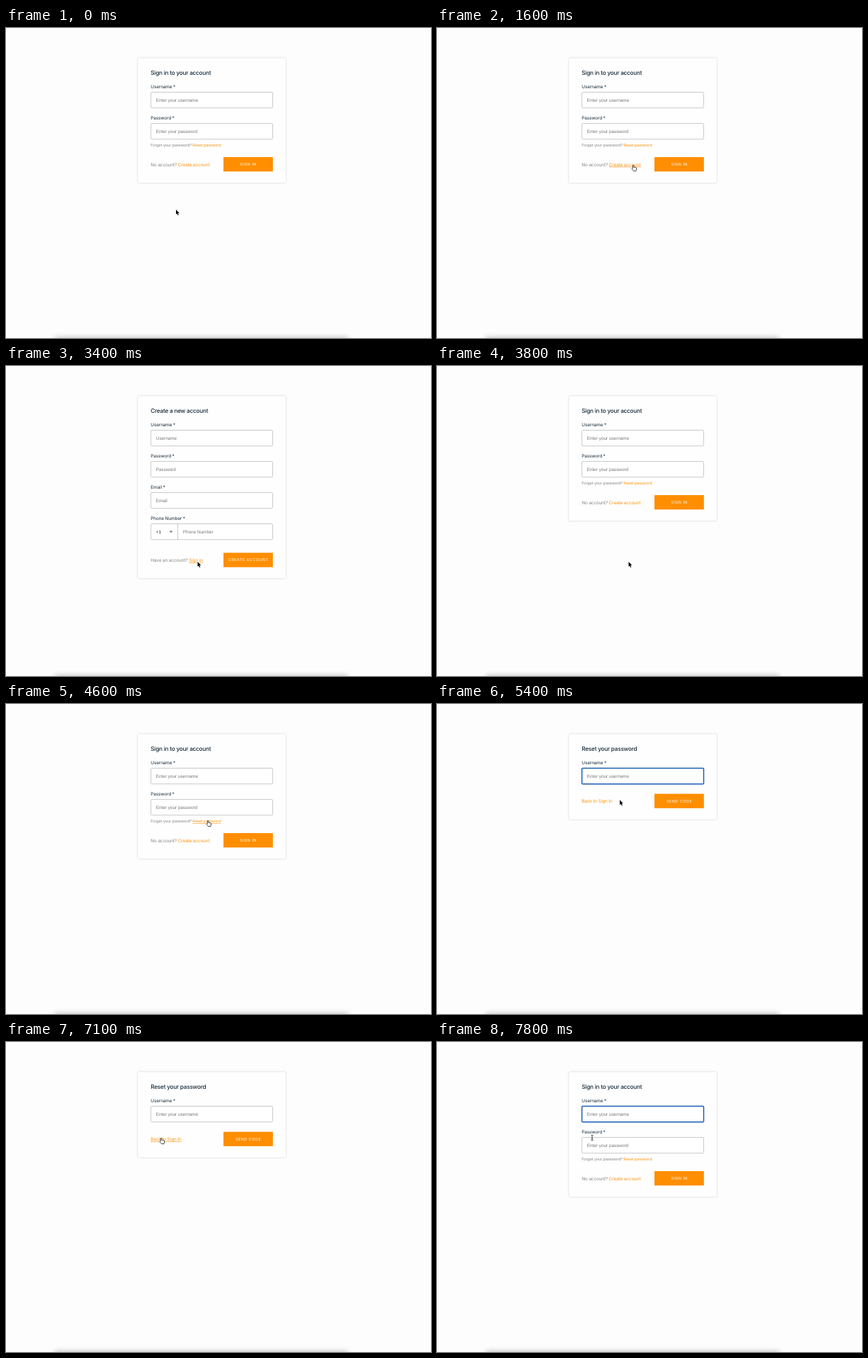
These frames come from a looping animation (600 by 437 pixels, 8 s). An HTML page:

```html
<!DOCTYPE html>
<html lang="en">
<head>
<meta charset="utf-8">
<title>Sign-in flow</title>
<style>
  html, body { margin: 0; width: 100%; height: 100%; overflow: hidden; background: #fdfdfd; }
  svg { display: block; width: 100vw; height: 100vh; }
  text { font-family: Inter, "Liberation Sans", sans-serif; text-rendering: geometricPrecision; white-space: pre; }
  .card { fill: #fefefe; filter: drop-shadow(.5px .5px .9px rgba(0, 0, 0, .22)); }
  .title { font-size: 8.18px; font-weight: 500; letter-spacing: -.21px; fill: #152939; }
  .label { font-size: 6.37px; letter-spacing: -.1px; fill: #152939; }
  .hint { font: 6.37px "Liberation Sans", Arial, sans-serif; fill: #757575; }
  .code { fill: #222; }
  .note { font-size: 6.37px; letter-spacing: -.1px; fill: #828282; }
  .small { font-size: 5.46px; letter-spacing: -.07px; }
  .link { fill: #ff9208; }
  .link.hover { text-decoration: underline; text-decoration-thickness: .55px; }
  .box { fill: #fff; stroke: #bdbdbd; stroke-width: .8; }
  .box.focus { stroke: #1c5fb8; stroke-width: 1.5; }
  .button { fill: #ff8e00; }
  .caption { font-size: 5.46px; letter-spacing: .5px; fill: #fff; text-anchor: middle; }
  .arrow { fill: #000; stroke: #fff; stroke-width: .6; paint-order: stroke; }
  .hand { fill: #fff; stroke: #222; stroke-width: .8; stroke-linejoin: round; }
  .beam { fill: none; stroke: #222; stroke-width: .8; }
</style>
</head>
<body>
<svg viewBox="0 0 600 437" xmlns="http://www.w3.org/2000/svg">
  <defs>
    <filter id="blur" x="-10%" y="-300%" width="120%" height="700%"><feGaussianBlur stdDeviation="3.5"/></filter>
  </defs>
  <rect width="600" height="437" fill="#fdfdfd"/>
  <rect x="69" y="435.5" width="414" height="8" fill="#000" opacity=".22" filter="url(#blur)"/>
  <g id="screens"></g>
  <g id="cursor">
    <path class="arrow" d="M0 0V6.8L1.5 5.4 2.6 8 3.8 7.5 2.7 5H4.8Z"/>
    <path class="hand" d="M-.6 4.7V1a.75.75 0 0 1 1.5 0V3.2L3.8 3.7Q4.8 4 4.7 5L4 8.6H.6L-1.8 5.6Q-2 4.4-.6 4.7Z"/>
    <path class="beam" d="M-1.5-3.8Q0-3.8 0-2.9Q0-3.8 1.5-3.8M0-3V3M-1.5 3.8Q0 3.8 0 2.9Q0 3.8 1.5 3.8M-.8 1H.8"/>
  </g>
</svg>
<script>
const LOOP = 8000, STEP = 100, LEFT = 204.3;

// Links carry their hit area as [x0, x1, y0, y1].
const screens = {
  signIn: {
    title: 'Sign in to your account', bottom: 218.3, buttonY: 182, button: 'SIGN IN',
    fields: [['Username', 'Enter your username'], ['Password', 'Enter your password']],
    small: ['Forget your password? ', 'Reset password', [264, 305, 161, 169]],
    note: ['No account? ', 'Create account', [243, 288, 188, 197]]
  },
  create: {
    title: 'Create a new account', bottom: 299.3, buttonY: 263.3, button: 'CREATE ACCOUNT',
    fields: [['Username', 'Username'], ['Password', 'Password'], ['Email', 'Email'], ['Phone Number', 'Phone Number', true]],
    note: ['Have an account? ', 'Sign in', [258, 278, 269, 278]]
  },
  reset: {
    title: 'Reset your password', bottom: 162.7, buttonY: 126.6, button: 'SEND CODE',
    fields: [['Username', 'Enter your username']],
    note: ['', 'Back to Sign In', [204, 248, 132, 142]]
  }
};

// Pointer route as [time, x, y]
const route = [
  [0, 240, 256], [100, 250, 199], [200, 250, 199], [300, 251, 178], [600, 280, 104],
  [800, 338, 108], [1100, 283, 122], [1500, 277, 195], [1600, 277, 193], [1900, 277, 193],
  [2200, 315, 205], [2400, 320, 216], [2800, 285, 263], [3100, 270.5, 276], [3900, 270.5, 276],
  [4500, 285, 166], [4600, 285, 164], [5000, 285, 164], [5400, 258, 135.3], [5800, 258, 135.3],
  [6300, 224, 76], [6700, 225, 136], [6900, 219, 135], [LOOP, 219, 135]
];

const fieldY = i => 90.5 + 44 * i;
const text = (cls, x, y, body) => `<text class="${cls}" x="${x}" y="${y}">${body}</text>`;
const linked = (cls, y, [lead, link]) => text(cls, LEFT, y, `${lead}<tspan class="link">${link}</tspan>`);

function field([label, hint, phone], i) {
  const y = fieldY(i);
  const prefix = phone
    ? `<path d="M242.5 ${y}v22" stroke="#bdbdbd" stroke-width=".8"/>` +
      text('hint code', 211.8, y + 13.5, '+1') +
      `<path d="M230.6 ${y + 10}h4.8l-2.4 2.7z" fill="#777"/>`
    : '';
  return text('label', LEFT, y - 5.1, label + ' *') +
    `<rect class="box" x="204.6" y="${y}" width="171.9" height="22.2" rx="1.3"/>` +
    prefix + text('hint', phone ? 249.8 : 211.8, y + 13.5, hint);
}

function draw(s) {
  return `<rect class="card" x="186.2" y="42.3" width="208.8" height="${s.bottom - 42.3}" rx="2.2"/>` +
    text('title', LEFT, 66.2, s.title) +
    s.fields.map(field).join('') +
    (s.small ? linked('note small', 167, s.small) : '') +
    linked('note', s.buttonY + 12.6, s.note) +
    `<rect class="button" x="307" y="${s.buttonY}" width="69.8" height="20.3"/>` +
    text('caption', 342.1, s.buttonY + 11.9, s.button);
}

const root = document.getElementById('screens');
for (const s of Object.values(screens)) {
  s.node = document.createElementNS('http://www.w3.org/2000/svg', 'g');
  s.node.innerHTML = draw(s);
  root.append(s.node);
  s.links = [s.small, s.note].filter(Boolean).map(l => l[2]);
  s.linkNodes = s.node.querySelectorAll('.link');
  s.firstBox = s.node.querySelector('.box');
}

const cursor = document.getElementById('cursor');
const shapes = Object.fromEntries(['arrow', 'hand', 'beam'].map(k => [k, cursor.querySelector('.' + k)]));

const inside = (x, y, [x0, x1, y0, y1]) => x >= x0 && x <= x1 && y >= y0 && y <= y1;

function pointerAt(t) {
  const i = route.findIndex(k => k[0] > t);
  const [t0, x0, y0] = route[i - 1], [t1, x1, y1] = route[i];
  const k = (t - t0) / (t1 - t0);
  return [x0 + (x1 - x0) * k, y0 + (y1 - y0) * k];
}

function screenAt(t) {
  if (t >= 1800 && t < 3500) return screens.create;
  if (t >= 4700 && t < 7200) return screens.reset;
  return screens.signIn;
}

function render(now) {
  const t = Math.floor((now % LOOP) / STEP) * STEP;
  const [x, y] = pointerAt(t);
  const current = screenAt(t);
  for (const s of Object.values(screens)) s.node.style.display = s === current ? '' : 'none';

  const hover = current.links.findIndex(area => inside(x, y, area));
  current.linkNodes.forEach((n, i) => n.classList.toggle('hover', i === hover));
  current.firstBox.classList.toggle('focus', t >= 4700 && t !== 7100);

  const onField = current.fields.some((f, i) => inside(x, y, [204, 377, fieldY(i), fieldY(i) + 22.5]));
  const pressed = t >= 3300 && t < 3500;
  const kind = hover >= 0 && !pressed ? 'hand' : onField ? 'beam' : 'arrow';
  for (const k in shapes) shapes[k].style.display = k === kind ? '' : 'none';
  cursor.setAttribute('transform', `translate(${x} ${y})`);
}

const start = performance.now();
function tick() {
  render(performance.now() - start);
  requestAnimationFrame(tick);
}
tick();
</script>
</body>
</html>
```
